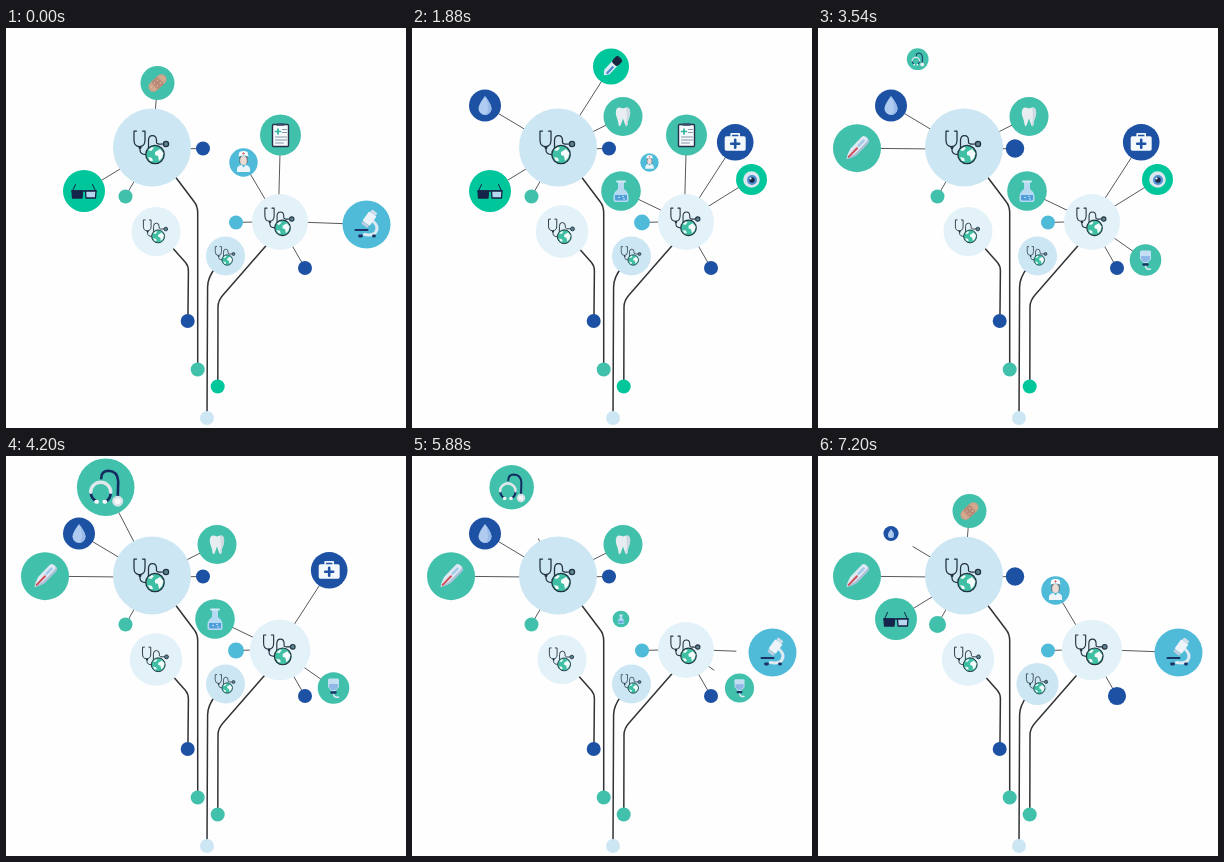
Write an HTML page that moves like this. It is 400 by 400 pixels and loops after 7.22 s.

```html
<!DOCTYPE html>
<html lang="en">
<head>
<meta charset="utf-8">
<title>Health network</title>
<style>
html, body { margin: 0; width: 100%; height: 100%; overflow: hidden; background: #fefefe; }
svg { display: block; width: 100vw; height: 100vh; --green: #00c69b; }
path, line { stroke-linecap: round; stroke-linejoin: round; }
.stem { fill: none; stroke: #303235; stroke-width: 1.5; }
.link { stroke: #56595d; stroke-width: 1; stroke-linecap: butt; }
.o { fill: none; }
</style>
</head>
<body>
<svg id="stage" viewBox="0 0 400 400">
  <defs>
    <g id="care">
      <g class="o" stroke="#22313d" stroke-width="1.25">
        <path d="M-15.500 -16.500h-2.500v9q0 6.500 5.500 6.500t5.500-6.500v-9h-2.500"/>
        <path d="M-12 -.5v3q0 4.500 6 4.500M-3.500 1v-8q0-5 4-5t4 5v2q0 2 6.500 1.500"/>
        <circle cx="14" cy="-3.500" r="2.600" fill="#5c8492"/>
      </g>
      <circle cx="-12" cy="0" r="1.500" fill="#22313d"/>
      <circle cx="3" cy="7" r="9.200" fill="#3fbfa3" stroke="#22313d" stroke-width="1.300"/>
      <path d="M3 4.500l5-3 3.500 4-1.500 5-3 3-1-5-3-1zM-4 2.500l4-3 2 1-3 3zM-4 9.500l4 1 1 3-3 0z" fill="#f5fbfb"/>
    </g>
    <g id="bandage" transform="rotate(-43)">
      <rect x="-10.500" y="-5" width="21" height="10" rx="5" fill="#cfa389"/>
      <rect x="-4" y="-5" width="8" height="10" fill="#b98b76"/>
      <path d="M-2-2h.1M2-2h.1M-2 2h.1M2 2h.1M-7-1h.1M7-1h.1M-7 2h.1M7 2h.1" stroke="#e7cbb9" stroke-width="1.200"/>
    </g>
    <g id="glasses" stroke="#16234a" stroke-width="1.300">
      <path class="o" d="M-11.500 0l3-6.500M11.500 0l-3-6.500" stroke-width="1"/>
      <path d="M-12 0h24"/>
      <path d="M-12 0h10.500l-.5 7h-9.500z" fill="#16234a"/>
      <path d="M12 0H1.500l.5 7h9.500z" fill="#b5d8ef"/>
    </g>
    <g id="drop">
      <path d="M0-9.500Q6.500-1 6.500 3A6.500 6.500 0 0 1-6.500 3Q-6.500-1 0-9.500z" fill="#b0cbf0"/>
      <path d="M0-9.500Q6.500-1 6.500 3A6.500 6.500 0 0 1 0 9.500Q6 4 0-9.500z" fill="#9abbe9"/>
    </g>
    <g id="pill" transform="translate(1)rotate(-47)">
      <path d="M-12 0l3-2.500 2-1H4v7H-7l-2-1z" fill="#dcebf6"/>
      <path d="M-8 1h8" stroke="#4f87cd" stroke-width="2.200"/>
      <rect x="3" y="-4" width="9" height="8" rx="3" fill="#1c2540"/>
    </g>
    <g id="tooth">
      <path d="M0-8Q-7-11.500-7.200-4C-7 1-5 2-4.500 8Q-3.500 12-1.700 7L0 2 1.700 7Q3.500 12 4.500 8C5 2 7 1 7.200-4Q7-11.500 0-8z" fill="#e8edf1"/>
      <path d="M3-8.800Q7-9.500 7.200-4C7 1 5 2 4.500 8Q3.800 10.500 2.500 9 5 0 3-8.800z" fill="#cfd9e1"/>
    </g>
    <g id="clipboard">
      <rect x="-8" y="-10.500" width="16" height="22" rx="1" fill="#f7fafc" stroke="#26304a" stroke-width="1.400"/>
      <path d="M-3-10.500h6" stroke="#3b4c6c" stroke-width="2.600"/>
      <path d="M-5-3.500h5M-2.500-6v5" stroke="#32b59d" stroke-width="1.700"/>
      <path d="M2-5.500h4M2-2.500h4M-5 2H6M-5 5H6M-5 8H3" stroke="#8496a8" stroke-width="1"/>
    </g>
    <g id="nurse">
      <path d="M-4-6h8v6Q3 2 0 2T-4 0z" fill="#6d5a5c"/>
      <ellipse cy="-2" rx="3.400" ry="4.500" fill="#ecdcd5"/>
      <path d="M-5-6l1-4.500q4-2 8 0L5-6q-5-2-10 0z" fill="#fff"/>
      <path d="M-1-9h2M0-10v2" stroke="#d75f65" stroke-width=".8"/>
      <path d="M-6.500 9.500V6Q-6 3-2 2.500L0 5 2 2.500Q6 3 6.500 6v3.500z" fill="#edf4fa"/>
    </g>
    <g id="flask">
      <path d="M-3-9.500h6V-2Q7.500 1 7.500 6v3q0 2-2 2h-11q-2 0-2-2V6Q-7.500 1-3-2z" fill="#b5daf2"/>
      <path d="M-6 4H6v4q0 1.500-1.500 1.500h-9Q-6 9.500-6 8z" fill="#4f9eda"/>
      <path d="M-4-9.500h8" stroke="#d5ebf8" stroke-width="1.800"/>
      <path d="M-2 6.500h.1M2 5.500h.1M3 8h.1" stroke="#d5ebf8" stroke-width="1.500"/>
    </g>
    <g id="kit">
      <path class="o" d="M-4-6v-2.500h8V-6" stroke="#eef5fc" stroke-width="1.700"/>
      <rect x="-10.500" y="-6" width="21" height="14.500" rx="1.700" fill="#f3f8fc"/>
      <path d="M-4 1.500h8M0-2.500v8" stroke="#1d51a4" stroke-width="2.600" stroke-linecap="butt"/>
    </g>
    <g id="eye">
      <circle r="8.300" fill="#dce6ef"/>
      <circle cx=".5" cy=".5" r="5" fill="#4d8ed0"/>
      <circle cx=".5" cy=".5" r="2.700" fill="#192749"/>
      <circle cx="-1" cy="-1" r="1.100" fill="#fff"/>
    </g>
    <g id="drip">
      <path d="M-4-9.500h8q1.500 0 1.500 1.500v7L2 3h-4l-3.500-4v-7q0-1.500 1.500-1.500z" fill="#c4def3"/>
      <path d="M-4.500-4h9v3L2 2h-4l-2.500-3z" fill="#8fb8e6"/>
      <path d="M-2 4.500h4" stroke="#1e3568" stroke-width="2.400"/>
      <path class="o" d="M0 6.500q1 3.500 5 2.500" stroke="#dbeaf5" stroke-width="1.400"/>
    </g>
    <g id="thermo" transform="rotate(-46)">
      <path d="M-15 0l4-2.500 6-2H11q3.500 0 3.500 4.500T11 4.500H-5l-6-2z" fill="#dfe9f3"/>
      <path d="M-15 0l4 2.500 6 2H11q3.500 0 3.500-4.500-.5 2.500-3.500 2.500H-5z" fill="#a9bdd8"/>
      <path d="M-12 0H0" stroke="#cf5058" stroke-width="2"/>
      <path d="M3-.5h7" stroke="#a4c9e9" stroke-width="2.600"/>
    </g>
    <g id="scope" class="o">
      <path d="M-4.500-9Q-4.500-16.500 3-16.500 12-16 12.500-6L12 12" stroke="#152c60" stroke-width="2.600"/>
      <path d="M-15 5Q-14.500 12-9 14M5 5Q5 12 0 14" stroke="#152c60" stroke-width="2.600"/>
      <path d="M-15 5A10 10 0 1 1 5 5" stroke="#dfe6ec" stroke-width="3.500"/>
      <path d="M-9.500 14.500h.8M-.5 14.500h-.8" stroke="#f4f7f9" stroke-width="4"/>
      <circle cx="12" cy="14" r="5.500" fill="#d9e2e9"/>
      <circle cx="12" cy="14" r="3" fill="#f6f8fa"/>
    </g>
    <g id="micro">
      <path class="o" d="M7-3Q13 3 9 8 6 11.500-2 10" stroke="#dfeaf3" stroke-width="3"/>
      <g transform="translate(3 -6)rotate(36)">
        <rect x="-4.500" y="-6" width="9" height="12" rx="1.500" fill="#edf3f8"/>
        <path d="M-2.500 7.500h5" stroke="#bccddd" stroke-width="3"/>
        <path d="M-2-7.500h4" stroke="#d3deea" stroke-width="3"/>
      </g>
      <path d="M-11 5.500H1" stroke="#1b3262" stroke-width="2"/>
      <path d="M-7 11.500h2M7 11.500h1" stroke="#1b3262" stroke-width="2.800"/>
    </g>
  </defs>
  <g id="links"></g>
  <path class="stem" d="M168 147L188 173.500Q191.700 178 191.700 185V341"/>
  <path class="stem" d="M164 217L179.500 234.500Q182.500 238 182.400 243L181.900 293"/>
  <path class="stem" d="M210 239Q201.700 249 201.600 259L201 390"/>
  <path class="stem" d="M261.500 216L217 267Q212 272.500 212 279L211.800 358"/>
  <g id="nodes"></g>
</svg>
<script>
const LOOP = 7220, GROW = 400, DRAW = 280;
const TEAL = '#41c0ab', GREEN = 'var(--green)', BLUE = '#1d51a3', CYAN = '#4fbbd8';
const PALE = '#e3f1f9', SKY = '#cce6f3';

// x, y, radius, colour, icon scale, swell, times of largest size
const hubs = [
  [146, 119.500, 39, SKY, 1, 0, []],
  [274, 194, 28, PALE, .84, .085, [2800, 4150, 7300]],
  [150, 203.500, 24.500, PALE, .7, .07, [1880, 4200, 7250]],
  [219.500, 228, 19.500, SKY, .57, .08, [7250]]
];

// Where the links of the first two hubs meet.
const roots = [[146.300, 121.300], [272.200, 193.300]];

// x, y, radius, colour, swell, times of largest size, hub
const dots = [
  [197, 120.500, 7, BLUE, .32, [3500, 5050, 7250], 0],
  [119.500, 168.500, 7, TEAL, .22, [7250], 0],
  [230, 194.500, 7, CYAN, .14, [1800, 4150, 6400], 1],
  [299, 240, 7, BLUE, .32, [2800, 5200, 7300], 1],
  [181.700, 293, 7, BLUE],
  [191.700, 341.500, 7, TEAL],
  [211.700, 358.500, 7, GREEN],
  [201, 390, 7, SKY]
];

// icon, x, y, radius, colour, hub, grow start, shrink start, link delay
const bubbles = [
  ['bandage', 151.500, 55, 17, TEAL, 0, 6240, 250],
  ['glasses', 78, 163, 21, GREEN, 0, 6230, 2590],
  ['drop', 73, 77.500, 16, BLUE, 0, 750, 6990, 270],
  ['pill', 199, 38.500, 18, GREEN, 0, 200, 2260],
  ['tooth', 211, 88.500, 19.500, TEAL, 0, 1100, 6350, 135],
  ['clipboard', 274.500, 107, 20.500, TEAL, 1, -GROW, 2150],
  ['nurse', 237.500, 134.500, 14.200, CYAN, 1, 6600, 1740],
  ['flask', 209, 163, 19.800, TEAL, 1, 1000, 5650],
  ['kit', 323.200, 114.300, 18.300, BLUE, 1, 700, 4600],
  ['eye', 339.500, 151.500, 15.500, GREEN, 1, 1100, 3740],
  ['drip', 327.500, 232, 15.800, TEAL, 1, 2250, 5850],
  ['thermo', 39, 120.200, 24, TEAL, 0, 2690, LOOP + DRAW],
  ['scope', 99.700, 31.200, 28.800, TEAL, 0, 3390, 5790],
  ['micro', 360.500, 196.500, 24, CYAN, 1, 5400, 400]
];

const stage = document.getElementById('stage');
const links = document.getElementById('links');
const nodes = document.getElementById('nodes');

function add(parent, tag, attrs) {
  const el = document.createElementNS('http://www.w3.org/2000/svg', tag);
  for (const key in attrs) el.setAttribute(key, attrs[key]);
  return parent.appendChild(el);
}

function disc(x, y, r, fill, icon, size = 1) {
  const g = add(nodes, 'g');
  add(g, 'circle', { r, fill });
  if (icon) add(add(g, 'g', { transform: `scale(${size})` }), 'use', { href: '#' + icon });
  return s => g.setAttribute('transform', `translate(${x} ${y}) scale(${s})`);
}

// Spans the gap between a hub's rim and a node's rim.
function link(x, y, r, hub) {
  const [rx, ry] = roots[hub], rim = hubs[hub][2];
  const len = Math.hypot(x - rx, y - ry);
  const ux = (x - rx) / len, uy = (y - ry) / len;
  const el = add(links, 'line', { class: 'link', x1: rx + ux * (rim - 4), y1: ry + uy * (rim - 4) });
  return k => {
    const d = rim + (len - r - rim + 1) * k;
    el.setAttribute('x2', rx + ux * d);
    el.setAttribute('y2', ry + uy * d);
    el.setAttribute('visibility', k > .01 ? 'visible' : 'hidden');
  };
}

const clamp = v => Math.max(0, Math.min(1, v));

// Nodes whose start is after their end stay on across the loop point.
function presence(t, start, end, span) {
  const on = clamp((t - start) / span), off = 1 - clamp((t - end) / span);
  return start < end ? Math.min(on, off) : Math.max(on, off);
}

function swell(t, peaks) {
  return Math.max(0, ...peaks.map(p => {
    const d = Math.min(1, Math.abs(t - p) / 600);
    return (1 + Math.cos(Math.PI * d)) / 2;
  }));
}

const parts = [];

for (const [x, y, r, fill, size, amp, peaks] of hubs) {
  const scale = disc(x, y, r, fill, 'care', size);
  parts.push(t => scale(1 + amp * swell(t, peaks)));
}

for (const [x, y, r, fill, amp = 0, peaks = [], hub] of dots) {
  const scale = disc(x, y, r, fill);
  if (hub !== undefined) link(x, y, r, hub)(1);
  parts.push(t => scale(1 + amp * swell(t, peaks)));
}

for (const [icon, x, y, r, fill, hub, start, end, delay = 0] of bubbles) {
  const scale = disc(x, y, r, fill, icon);
  const reach = link(x, y, r, hub);
  const linkStart = start < 0 ? start : start + 300;
  parts.push(t => {
    scale(presence(t, start, end, GROW));
    reach(presence(t, linkStart, end - 150 + delay, DRAW));
  });
}

const begin = performance.now();

function frame() {
  const t = (performance.now() - begin) % LOOP;
  stage.style.setProperty('--green', t < 3900 ? '#00c69b' : TEAL);
  for (const update of parts) update(t);
  requestAnimationFrame(frame);
}
frame();
</script>
</body>
</html>
```
